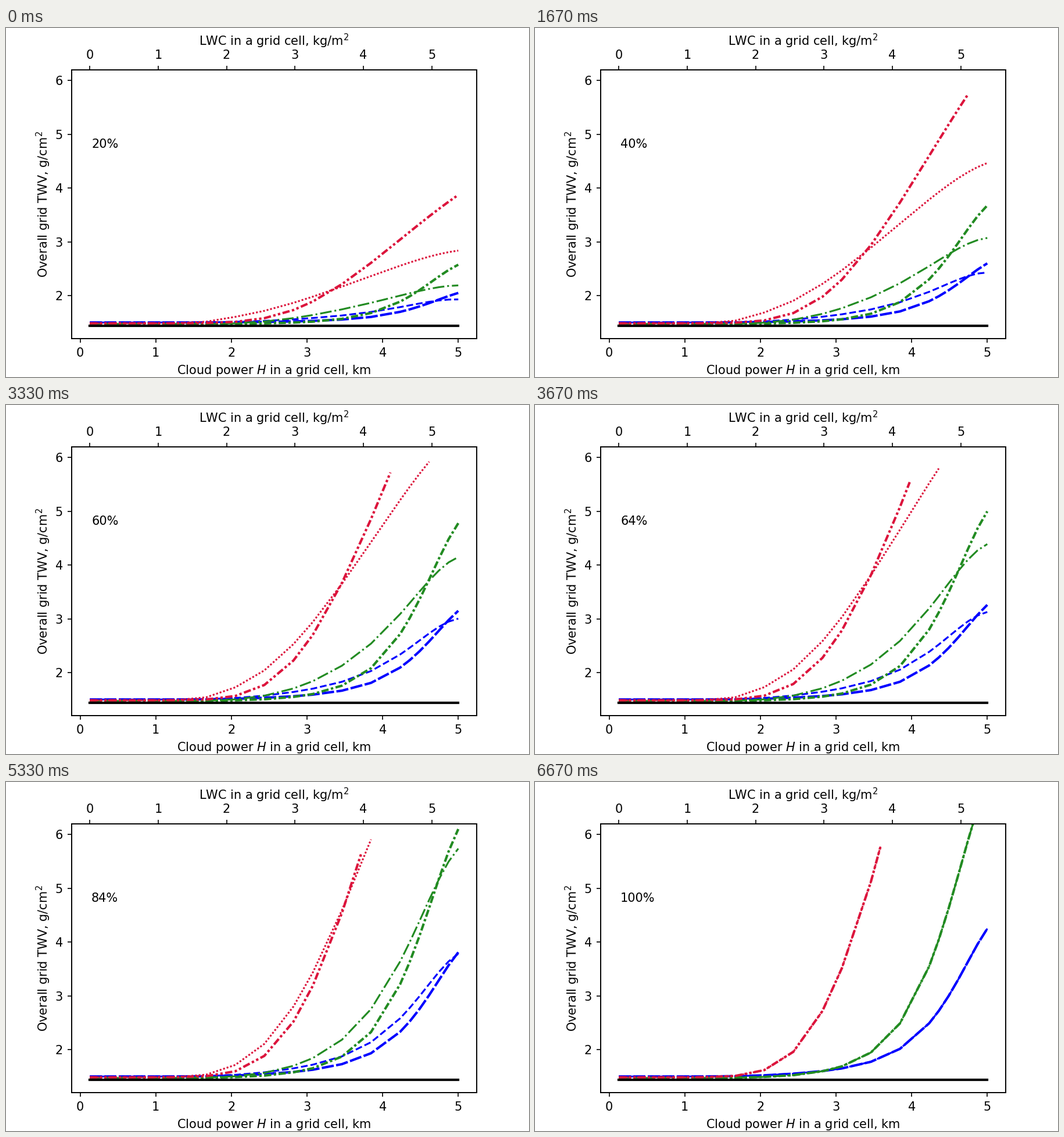
Write a matplotlib script that moves like this. It is 900 by 600 pixels and loops after 7 s.

```python
import numpy as np
import matplotlib.pyplot as plt
from matplotlib.animation import FuncAnimation
from numpy.polynomial.polynomial import polyval

STEPS = 21      # cloud cover from 20% to 100%
HOLD = 10       # ticks per cover step
LOOP_MS = 7000

CELLS = np.arange(1, 40)
H = CELLS * 5 / 39
# Both curve families are sampled here and joined by straight pieces.
KNOTS = np.r_[1:23:3, 24:33:3, 33:40]
DEPTH = (39 - KNOTS) * 5 / 39

# growth: log of the full-cover excess, as a polynomial in depth below 5 km
# mix, fade: how averaging over the cell bends the curve under partial cover
BANDS = [
    dict(color="blue", base=1.500, limit=np.inf,
         thick=(0, (5, 1)), thin="--",
         growth=(1.012, -.722, -1.201, .6147, -.106),
         mix=(.17, .9, .05, -.07), fade=-.5),
    dict(color="forestgreen", base=1.473, limit=np.inf,
         thick=(0, (3, 1, 1, 1)), thin="-.",
         growth=(1.707, -.589, -1.207, .4725, -.0737),
         mix=(.02, .62, .62, -.21), fade=-.56),
    dict(color="crimson", base=1.485, limit=6,
         thick=(0, (3, 1, 1, 1, 1, 1)), thin=(0, (1, 1)),
         growth=(2.48, -.4, -.19, 0, -.022),
         mix=(-.43, .3, -.089, .086), fade=-.23),
]


def curves(band, cover):
    """Return the linear (thick) and the averaged (thin) curve."""
    clear = 1 - cover
    linear = cover * np.exp(polyval(DEPTH, band["growth"]))
    mix = np.minimum(polyval(DEPTH, band["mix"]), 2.2)
    averaged = linear * np.exp(mix * np.sqrt(clear) + band["fade"] * clear)
    return [band["base"] + np.interp(CELLS, KNOTS, y)
            for y in (linear, averaged)]


fig, ax = plt.subplots(figsize=(6, 4), dpi=150)
margin = .05 * (H[-1] - H[0])
left, right = H[0] - margin, H[-1] + margin
ax.set_xlim(left, right)
ax.set_ylim(1.2, 6.2)
ax.set_xticks(range(6))
ax.set_yticks(range(2, 7))
ax.set_xlabel("Cloud power $H$ in a grid cell, km")
ax.set_ylabel("Overall grid TWV, g/cm$^2$", labelpad=2.7)

top = ax.twiny()
km_per_lwc = .904
top.set_xlim((left - H[0]) / km_per_lwc, (right - H[0]) / km_per_lwc)
top.set_xticks(range(6))
top.set_xlabel("LWC in a grid cell, kg/m$^2$", labelpad=3.4)

lines = []
for band in BANDS:
    thick, = ax.plot([], [], color=band["color"], ls=band["thick"], lw=2)
    thin, = ax.plot([], [], color=band["color"], ls=band["thin"], lw=1.5)
    lines.append((thick, thin))
ax.plot(H, np.full_like(H, 1.433), color="black", lw=2)
label = ax.text(.15, 4.75, "")


def draw(tick):
    step = min((tick + 1) // HOLD, STEPS - 1)
    percent = 20 + 4 * step
    label.set_text(f"{percent}%")
    for band, pair in zip(BANDS, lines):
        for line, y in zip(pair, curves(band, percent / 100)):
            keep = y <= band["limit"]
            line.set_data(H[keep], y[keep])
    return [label, *(line for pair in lines for line in pair)]


anim = FuncAnimation(fig, draw, frames=STEPS * HOLD,
                     init_func=lambda: draw(0),
                     interval=LOOP_MS / (STEPS * HOLD),
                     repeat=True, repeat_delay=0)
plt.show()
```
